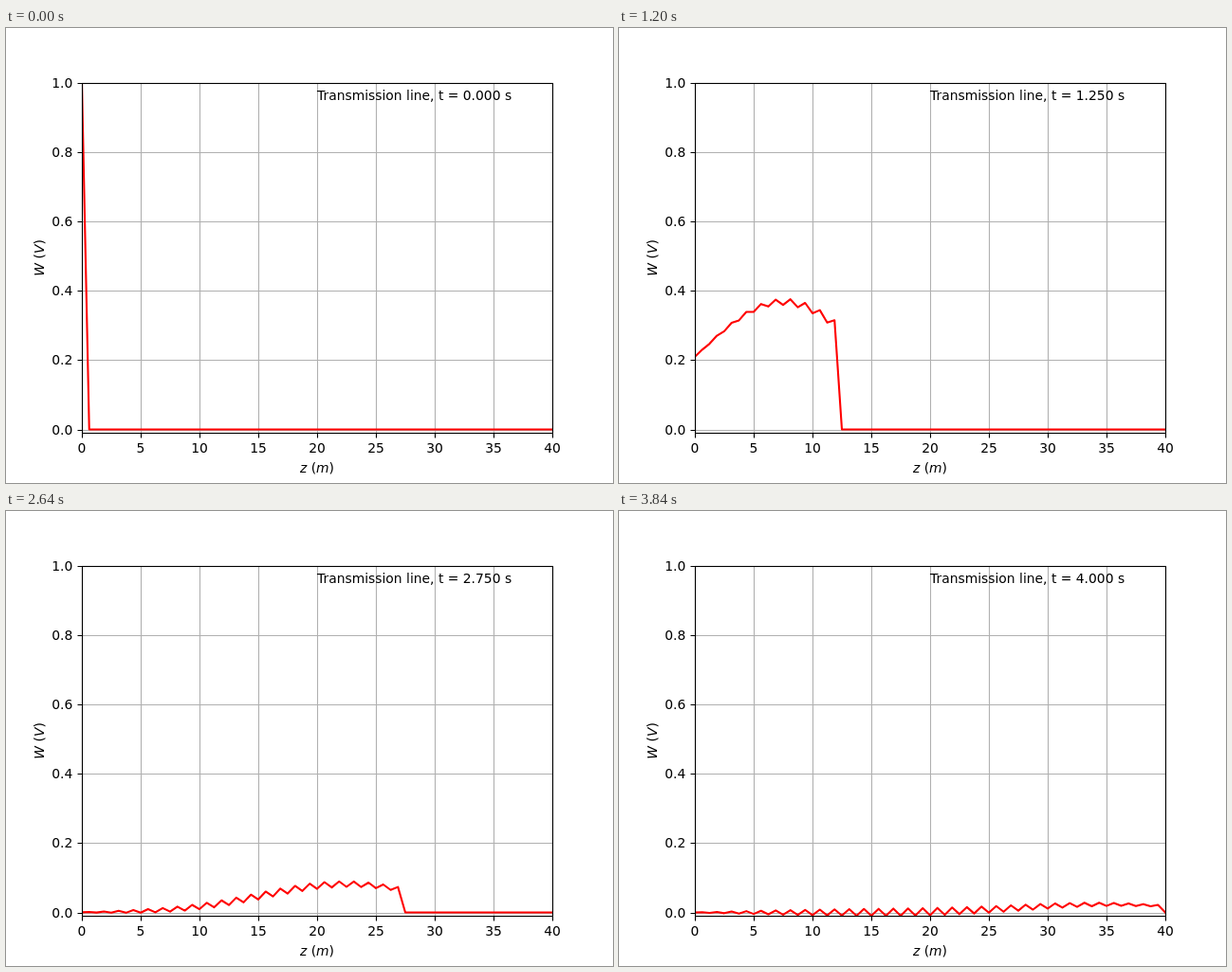
These frames come from a looping animation (640x480 px, 3.9 s). An HTML page:

```html
<!DOCTYPE html>
<html lang="en">
<head>
<meta charset="utf-8">
<style>
  html, body { margin: 0; width: 100%; height: 100%; overflow: hidden; background: #fff; }
  svg { display: block; }
  text { font: 13.889px "DejaVu Sans", sans-serif; white-space: pre; }
  .mid { text-anchor: middle; }
  .end { text-anchor: end; }
  .it { font-style: italic; }
  path, rect { fill: none; stroke-width: 1.11; }
  #grid { stroke: #b0b0b0; }
  #ticks, #frame { stroke: #000; }
  #wave { stroke: #f00; stroke-width: 2.083; stroke-linejoin: round; stroke-linecap: square; }
</style>
</head>
<body>
<svg width="640" height="480" viewBox="0 0 640 480">
  <clipPath id="axes"><path d="M80 58H577V428H80Z"/></clipPath>
  <path id="grid"/>
  <path id="ticks"/>
  <path id="wave" clip-path="url(#axes)"/>
  <rect id="frame" x="80.5" y="58.5" width="496" height="369"/>
  <g id="labels"></g>
  <text class="mid" x="328" y="469"><tspan class="it">z</tspan> (<tspan class="it">m</tspan>)</text>
  <text class="mid" transform="translate(40 242.4) rotate(-90)"><tspan class="it">W</tspan> (<tspan class="it">V</tspan>)</text>
  <text id="title" x="328" y="76"></text>
</svg>
<script>
const STEP_MS = 60, CELLS = 64, DT = 1 / 16;
const byId = id => document.getElementById(id);
const toX = z => 80 + z * 12.4;
const toY = w => 57.6 + (1 - w) * 369.6 / 1.01;
const snap = v => Math.floor(v + 0.5) + 0.5;

function drawAxes() {
  let grid = "", ticks = "", labels = "";
  for (let z = 0; z <= 40; z += 5) {
    const x = snap(toX(z));
    grid += `M${x} 58.5V427.5`;
    ticks += `M${x} 427.5V432.5`;
    labels += `<text class="mid" x="${toX(z)}" y="448">${z}</text>`;
  }
  for (let i = 0; i <= 5; i++) {
    const y = snap(toY(i / 5));
    grid += `M80.5 ${y}H576.5`;
    ticks += `M80.5 ${y}H75.5`;
    labels += `<text class="end" x="70.3" y="${Math.round(toY(i / 5) + 5)}">${(i / 5).toFixed(1)}</text>`;
  }
  byId("grid").setAttribute("d", grid);
  byId("ticks").setAttribute("d", ticks);
  byId("labels").innerHTML = labels;
}

// Leapfrog solution of W_tt + 2 W_t + W = c^2 W_zz with c dt = dz,
// driven at z = 0 by exp(-t^2) and held at zero at the far end.
function simulate() {
  const source = n => Math.exp(-((n * DT) ** 2));
  const rest = n => Array.from({ length: CELLS + 1 }, (_, i) => i ? 0 : source(n));
  const states = [rest(0), rest(1)];
  for (let n = 2; n <= CELLS; n++) {
    const now = states[n - 1], before = states[n - 2], next = rest(n);
    for (let i = 1; i < CELLS; i++) {
      next[i] = (now[i + 1] + now[i - 1] - (1 - DT) * before[i] - DT * DT * now[i]) / (1 + DT);
    }
    states.push(next);
  }
  return states;
}

// Seconds to three decimals, with halves rounded to even.
function seconds(n) {
  const ms = n * DT * 1000;
  let whole = Math.floor(ms);
  if (ms > whole && whole % 2) whole++;
  return (whole / 1000).toFixed(3);
}

const states = simulate();
let shown = -1;

function render() {
  const n = Math.floor(performance.now() / STEP_MS) % states.length;
  if (n !== shown) {
    shown = n;
    const points = states[n].map((w, i) => `${toX(i * 40 / CELLS)} ${toY(w).toFixed(3)}`);
    byId("wave").setAttribute("d", "M" + points.join("L"));
    byId("title").textContent = `Transmission line, t = ${seconds(n)} s`;
  }
  requestAnimationFrame(render);
}

drawAxes();
render();
</script>
</body>
</html>
```
